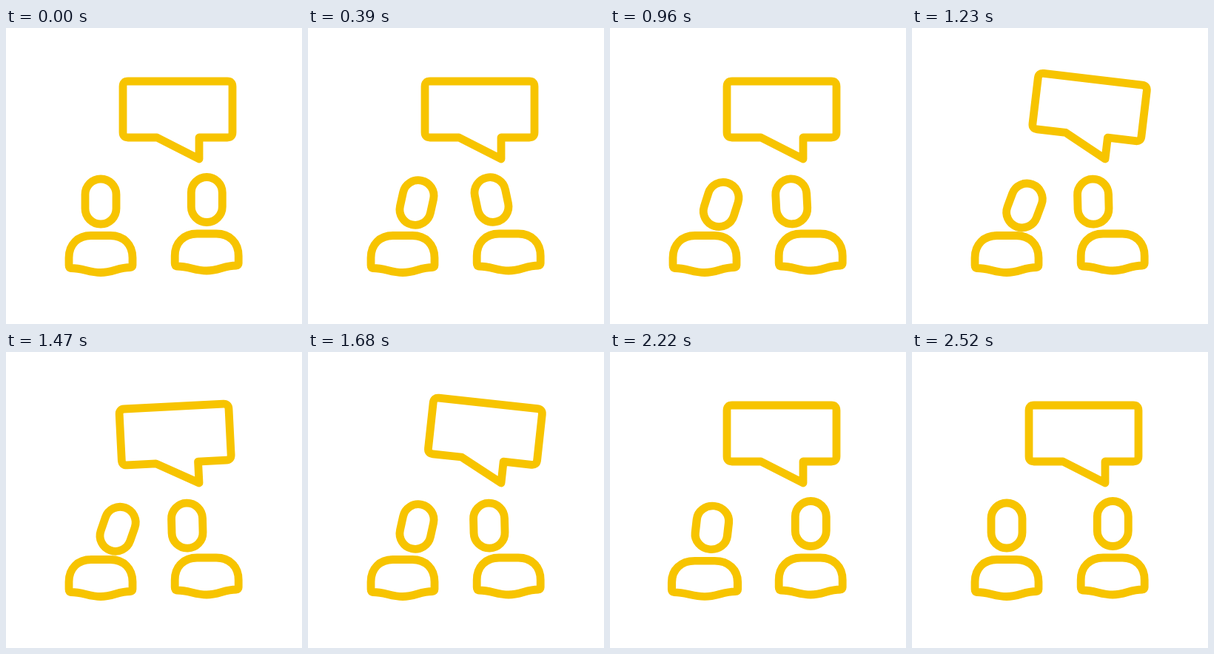
An HTML page for the animation above (3050 ms loop, 400x400 px).

```html
<!DOCTYPE html>
<html lang="en">
<head>
<meta charset="utf-8">
<title>Conversation</title>
<style>
  html, body { margin: 0; width: 100%; height: 100%; overflow: hidden; background: #fff; }
  svg { display: block; width: 100%; height: 100%; }
</style>
</head>
<body>
<svg viewBox="0 0 400 400" fill="none" stroke="#f7c400" stroke-width="10.8" stroke-linecap="round" stroke-linejoin="round">
  <defs>
    <rect id="head" x="-21" y="-30.5" width="42" height="61" rx="21"/>
    <path id="body" d="M-43 -10V-20C-43 -38 -31 -50 -13 -50H13C31 -50 43 -38 43 -20V-10Q43 -7 40 -7C24 -7 16 0 0 0C-16 0 -24 -6 -40 -6Q-43 -6 -43 -10Z"/>
  </defs>
  <path id="bubble" d="M165 72H299Q306 72 306 79V141Q306 148 299 148H261V177L204 148H165Q158 148 158 141V79Q158 72 165 72Z"/>
  <use id="headL" href="#head"/>
  <use id="bodyL" href="#body"/>
  <use id="headR" href="#head"/>
  <use id="bodyR" href="#body"/>
</svg>
<script>
  const LOOP = 3050, STEP = 30, END = 2520;
  const SWING = 14.5, SQUASH = 0.035;

  // Smooth 0 to 1 between two times.
  function ramp(t, from, to) {
    const p = Math.min(1, Math.max(0, (t - from) / (to - from)));
    return (1 - Math.cos(Math.PI * p)) / 2;
  }

  const pose = (id, value) => document.getElementById(id).setAttribute("transform", value);

  // Body and head flatten while a turn is under way.
  function person(side, turn, head, body) {
    const s = SQUASH * Math.sin(Math.PI * turn);
    const scale = `scale(${1 + s} ${1 - s})`;
    const dip = 60 * s;
    pose("head" + side, `translate(${head.x} ${head.y + dip}) rotate(${head.tilt}) ${scale}`);
    pose("body" + side, `translate(${body.x} ${body.y}) ${scale}`);
  }

  function draw(now) {
    const t = Math.min(Math.floor((now % LOOP) / STEP) * STEP, END);

    const swing = ramp(t, 1110, 1360) - 2 * ramp(t, 1360, 1555)
                + 2 * ramp(t, 1555, 1750) - ramp(t, 1750, 2080);
    pose("bubble", `rotate(${SWING * swing} 261 177)`);

    const turnL = ramp(t, 0, 370) - ramp(t, 2030, 2420);
    const nod = ramp(t, 600, 1220) - ramp(t, 1400, 1650);
    person("L", turnL, {
      x: 128 + 19 * turnL + 5 * nod,
      y: 234.5 + 1.5 * turnL + 4 * nod,
      tilt: 12.5 * turnL + 8 * nod
    }, { x: 128, y: 330.5 });

    const turnR = ramp(t, 0, 370) - ramp(t, 1740, 2160);
    const settle = turnR * ramp(t, 600, 1080);
    person("R", turnR, {
      x: 271.3 - 23.3 * turnR - 3.2 * settle,
      y: 232 + 2.7 * settle,
      tilt: -12 * turnR + 10.5 * settle
    }, { x: 271.2, y: 328 });
  }

  let start = null;
  function tick(now) {
    if (start === null) start = now;
    draw(now - start);
    requestAnimationFrame(tick);
  }
  draw(0);
  requestAnimationFrame(tick);
</script>
</body>
</html>
```
